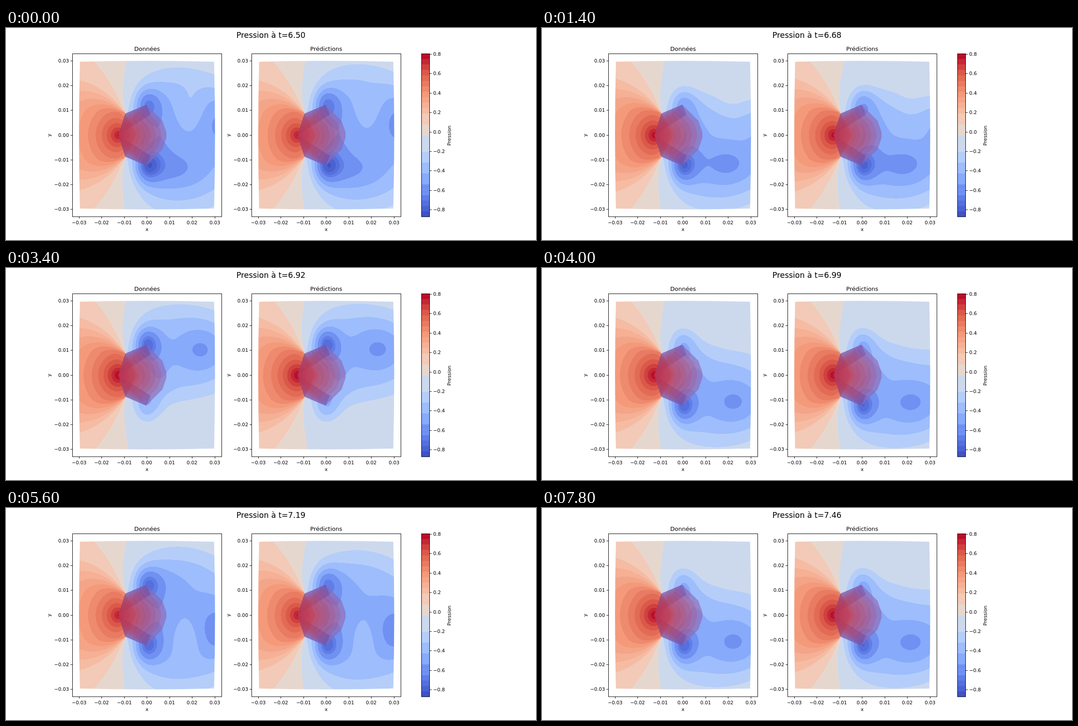
Recreate the animation shown at these times as an HTML page with a canvas. Size 1183 by 473 pixels, loop 8000 ms.

```html
<!DOCTYPE html>
<html lang="fr">
<head>
<meta charset="utf-8">
<title>Pression</title>
<style>
html, body { margin: 0; width: 100%; height: 100%; overflow: hidden; background: #fff; }
canvas { display: block; }
</style>
</head>
<body>
<canvas id="stage" width="1183" height="473"></canvas>
<script>
const ctx = document.getElementById('stage').getContext('2d');
const LOOP = 8000, STEP = 200, STEPS_PER_CYCLE = 19 / 3;
const P_MIN = -0.87, P_MAX = 0.807, BANDS = 30;
const PANEL_SHIFT = 400;
const FONT = '"DejaVu Sans", sans-serif';

// Plot geometry: one unit is 0.01 on the axes.
const ORIGIN_X = 314.8, ORIGIN_Y = 239.1, UNIT_X = 50.5, UNIT_Y = 55.25;
const FIELD = { x: 162, y: 72, w: 306, h: 335 };
const NOSE = { x: 251, y: 239 };

// Upper half of the body, relative to its nose.
const HALF_BODY = [[0, 0], [15, -48], [62, -68], [98, -32], [107, -6]];
const HALF_FACE = [[0, 0], [15, -48], [62, -68], [72, -46]];
const mirror = ([x, y]) => [x, -y];
const BODY = [...HALF_BODY, ...HALF_BODY.slice(1).reverse().map(mirror)];

const STOPS = '3b4cc0 6282ea 8db0fe b8d0f9 dddddd f5c4ad f49a7b dd5f4b b40426'
  .split(' ').map(hex => [0, 2, 4].map(i => parseInt(hex.substr(i, 2), 16)));

const wrap = v => v - Math.floor(v);
const clamp = (v, lo, hi) => Math.max(lo, Math.min(hi, v));

function colour(t) {
  const f = clamp(t, 0, 0.9999) * (STOPS.length - 1), i = Math.floor(f);
  return STOPS[i].map((v, j) => Math.round(v + (STOPS[i + 1][j] - v) * (f - i)));
}

// Neighbouring pale and blue bands share a tone.
function bandColour(k) {
  if (k >= 12 && k <= 14) return [204, 217, 237];
  if (k >= 15 && k <= 18) return k < 17 ? [230, 215, 206] : [242, 202, 183];
  const centre = k >= 4 && k < 12 ? k - k % 2 + 1 : k + 0.5;
  return colour(centre / BANDS);
}
const PALETTE = Array.from({ length: BANDS }, (_, k) => bandColour(k));

// Steady parts: stagnation pressure fanning out from the shoulders, and the wake mask.
const COUNT = FIELD.w * FIELD.h;
const px = new Float32Array(COUNT), py = new Float32Array(COUNT);
const ahead = new Float32Array(COUNT), behind = new Float32Array(COUNT);
for (let i = 0; i < COUNT; i++) {
  const x = px[i] = (FIELD.x + i % FIELD.w + 0.5 - ORIGIN_X) / UNIT_X;
  const y = py[i] = (ORIGIN_Y - FIELD.y - Math.floor(i / FIELD.w) - 0.5) / UNIT_Y;
  const rise = Math.abs(y) - 0.9;
  const pivot = -0.95 + 0.6 * Math.max(0, -rise / 0.9);
  const angle = Math.atan2(Math.max(rise, 0.02), pivot - x) * 180 / Math.PI;
  const fan = 1.25 * Math.exp(-((angle / 63) ** 2)) - 0.25;
  ahead[i] = fan / (1 + 0.67 * Math.hypot(x + 1.25, y));
  behind[i] = 1 / (1 + Math.exp(-(x + 0.5) / 0.3));
}

const bell = q => Math.exp(-q / 2);
const plateau = q => Math.exp(-q * q / 8);

// Shed vortices alternate between the lower (-1) and upper (+1) side.
function flow(phase, crestScale) {
  const swing = Math.sin(2 * Math.PI * (phase + 0.04)), tilt = swing * swing;
  const blobs = [
    { amp: 0.1 * tilt - 0.37, x: 1.5, y: -0.95 * swing, w: 2, h: 1.85 - 0.6 * tilt, shape: plateau },
    { amp: -0.08, x: 0.5, y: 0, w: 0.45, h: 0.9, shape: bell }];
  for (const side of [-1, 1]) {
    const life = wrap(phase + 0.1 + (side > 0 ? 0.5 : 0)), age = life - 0.1;
    const depth = 0.23 * Math.sqrt(Math.sin(Math.PI * Math.min(1, life / 0.75)));
    const crest = 0.09 * Math.sin(Math.PI * clamp((age - 0.25) / 0.45, 0, 1));
    blobs.push(
      { amp: 0.1 * swing * side - 0.42, x: -0.15, y: 1.25 * side, w: 0.48, h: 0.48, shape: bell },
      { amp: -depth, x: 1.1 + 2.5 * (1 - Math.exp(-4 * age)), y: side * (1.35 - 1.7 * age),
        w: 1 - 0.9 * Math.min(age, 0.6), h: 0.55 + 0.6 * age, shape: bell },
      { amp: crest * crestScale, x: 1.1 + 1.6 * age, y: side * (0.1 + 2.2 * age), w: 0.45, h: 0.55, shape: bell });
  }
  return { blobs, stagnation: 0.79 + 0.06 * tilt };
}

const buffer = document.createElement('canvas');
buffer.width = FIELD.w;
buffer.height = FIELD.h;
const bufferCtx = buffer.getContext('2d');
const image = bufferCtx.createImageData(FIELD.w, FIELD.h);

function renderField(phase, crestScale) {
  const { blobs, stagnation } = flow(phase, crestScale);
  for (let i = 0; i < COUNT; i++) {
    let wake = 0;
    for (const { amp, x, y, w, h, shape } of blobs) {
      const dx = (px[i] - x) / w, dy = (py[i] - y) / h, q = dx * dx + dy * dy;
      if (q < 16) wake += amp * shape(q);
    }
    const p = stagnation * ahead[i] + wake * behind[i];
    const k = Math.floor((p - P_MIN) / (P_MAX - P_MIN) * BANDS);
    image.data.set(PALETTE[clamp(k, 0, BANDS - 1)], i * 4);
    image.data[i * 4 + 3] = 255;
  }
  bufferCtx.putImageData(image, 0, 0);
}

// The mesh outline is a square with slightly bulging sides.
function traceMesh() {
  const l = 165, r = 464.5, t = 75.3, b = 402.7, bulge = 4;
  ctx.beginPath();
  ctx.moveTo(l, t);
  ctx.quadraticCurveTo((l + r) / 2, t - bulge, r, t);
  ctx.quadraticCurveTo(r + bulge, (t + b) / 2, r, b);
  ctx.quadraticCurveTo((l + r) / 2, b + bulge, l, b);
  ctx.quadraticCurveTo(l - bulge, (t + b) / 2, l, t);
}

function fillFromNose(points, scale, style) {
  ctx.beginPath();
  points.forEach(([x, y]) => ctx.lineTo(NOSE.x + x * scale, NOSE.y + y * scale));
  ctx.fillStyle = style;
  ctx.fill();
}

// Translucent layers shrink towards the nose, where they add up to deep red.
function drawBody() {
  fillFromNose(BODY, 1, 'rgba(125,125,218,0.55)');
  for (const face of [HALF_FACE, HALF_FACE.map(mirror)]) {
    fillFromNose(face, 1, 'rgba(70,50,165,0.3)');
  }
  for (let scale = 1; scale > 0.1; scale -= 0.11) {
    fillFromNose(BODY, scale, 'rgba(195,50,75,0.18)');
  }
}

function text(str, x, y, size, align = 'center') {
  ctx.font = `${size}px ${FONT}`;
  ctx.textAlign = align;
  ctx.fillStyle = '#000';
  ctx.fillText(str, x, y);
}

function verticalText(str, x, y) {
  ctx.save();
  ctx.translate(x, y);
  ctx.rotate(-Math.PI / 2);
  text(str, 0, 0, 10.8);
  ctx.restore();
}

function line(x1, y1, x2, y2) {
  ctx.beginPath();
  ctx.moveTo(x1, y1);
  ctx.lineTo(x2, y2);
  ctx.stroke();
}

const label = (v, digits) => v.toFixed(digits).replace('-', '\u2212');
const crisp = v => Math.floor(v) + 0.5;

function drawPanel(title, shift, phase, crestScale) {
  renderField(phase, crestScale);
  ctx.save();
  ctx.translate(shift, 0);
  ctx.save();
  traceMesh();
  ctx.clip();
  ctx.drawImage(buffer, FIELD.x, FIELD.y);
  ctx.restore();
  drawBody();

  ctx.strokeRect(148.5, 57.5, 333, 363.5);
  for (let i = -3; i <= 3; i++) {
    const x = crisp(ORIGIN_X + i * UNIT_X), y = crisp(ORIGIN_Y - i * UNIT_Y);
    line(x, 421, x, 425);
    line(144, y, 148, y);
    text(label(i / 100, 2), x - 0.3, 437.5, 10.8);
    text(label(i / 100, 2), 140.5, y + 3.8, 10.8, 'right');
  }
  text(title, 314.8, 50.5, 13);
  text('x', 314.8, 452.5, 10.8);
  verticalText('y', 100, 239);
  ctx.restore();
}

function drawScale() {
  const top = 57, height = 364, band = height / BANDS;
  PALETTE.forEach((c, k) => {
    ctx.fillStyle = `rgb(${c})`;
    ctx.fillRect(928, top + height - (k + 1) * band, 18, band + 0.4);
  });
  ctx.strokeRect(927.5, 57.5, 18, 363.5);
  for (let i = -4; i <= 4; i++) {
    const y = crisp(232 - i * 43.45);
    line(946, y, 950, y);
    text(label(i / 5, 1), 953.5, y + 3.8, 10.8, 'left');
  }
  verticalText('Pression', 993, 240);
}

function draw(step) {
  const phase = wrap(step / STEPS_PER_CYCLE);
  ctx.fillStyle = '#fff';
  ctx.fillRect(0, 0, 1183, 473);
  ctx.strokeStyle = '#000';
  ctx.lineWidth = 1;
  text(`Pression à t=${(6.504 + step * 0.0245).toFixed(2)}`, 591.3, 22, 17.4);
  drawPanel('Données', 0, phase, 1);
  drawPanel('Prédictions', PANEL_SHIFT, wrap(phase - 0.015), 0.7);
  drawScale();
}

let shown = -1;
function tick() {
  const step = Math.floor(performance.now() % LOOP / STEP);
  if (step !== shown) draw(shown = step);
  requestAnimationFrame(tick);
}
tick();
</script>
</body>
</html>
```
